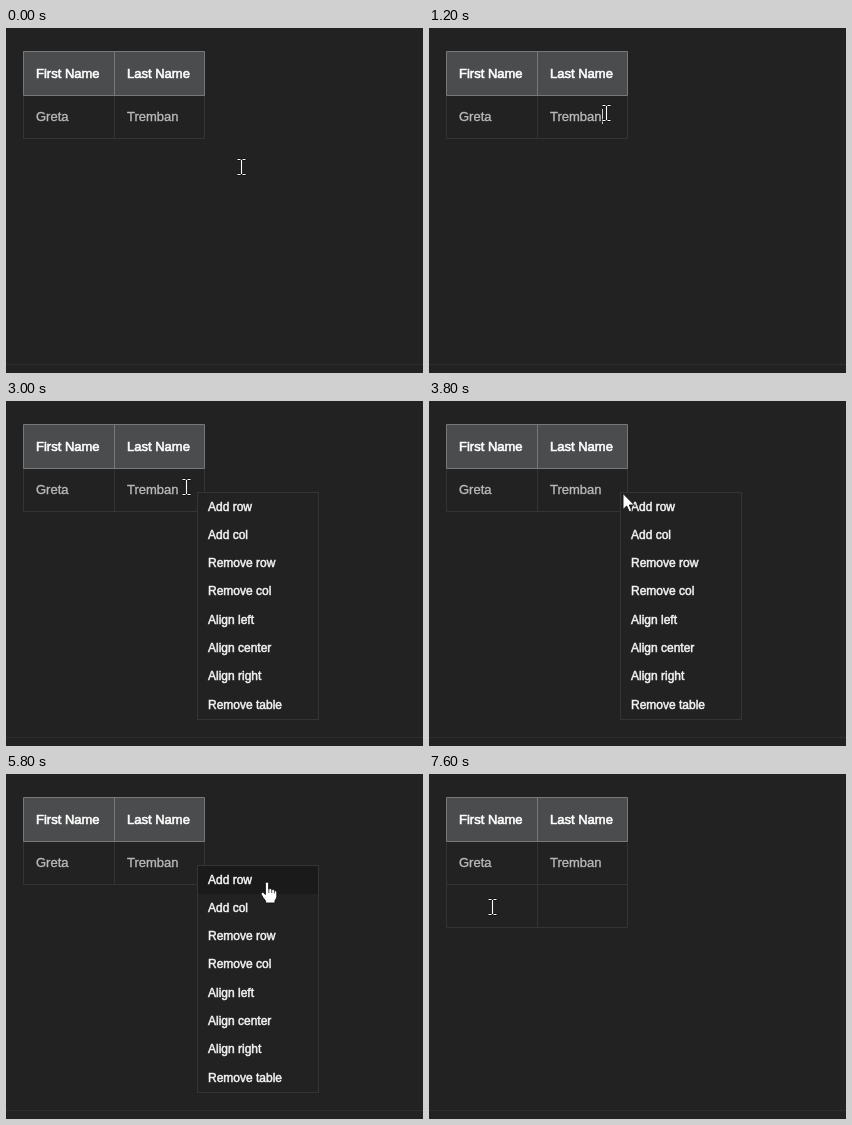
Write an HTML page that moves like this. It is 417 px wide and 345 px high and loops after 8000 ms.

```html
<!DOCTYPE html>
<html lang="en">
<head>
<meta charset="utf-8">
<title>Table editing</title>
<style>
html, body { margin: 0; width: 100%; height: 100%; overflow: hidden; background: #222; }
svg { display: block; width: 417px; height: 345px; }
text { font: 13px "Liberation Sans", Arial, sans-serif; white-space: pre; }
.head { fill: #fff; stroke: #fff; stroke-width: .6px; }
.cell { fill: #b9b9b9; stroke: #b9b9b9; stroke-width: .35px; }
.item { font-size: 12px; fill: #f4f4f4; stroke: #f4f4f4; stroke-width: .5px; }
.grid { fill: none; stroke: #343434; }
</style>
</head>
<body>
<svg viewBox="0 0 417 345">
  <defs>
    <path id="beamShape" d="M-4 -7.5H-1M1 -7.5H4M-4 7.5H-1M1 7.5H4M0 -7V7" fill="none"/>
  </defs>
  <rect width="417" height="345" fill="#222"/>
  <path d="M0 336.5H417" stroke="#302d2e"/>
  <path class="grid" d="M17.5 67V110.5H198.5V67M108.5 67V110"/>
  <path id="newRow" class="grid" d="M17.5 110V153.5H198.5V110M108.5 110V153"/>
  <path d="M17.5 23.5H198.5V67.5H17.5ZM108.5 23V67" fill="#4b4c4e" stroke="#77787a"/>
  <text class="head" x="30" y="50">First Name</text>
  <text class="head" x="121" y="50">Last Name</text>
  <text class="cell" x="30" y="93">Greta</text>
  <text class="cell" x="121" y="93">Tremban</text>
  <rect id="caret" width="1" height="15" fill="#d0d0d0"/>
  <g id="menu">
    <rect x="191.5" y="91.5" width="121" height="227" fill="#222" stroke="#343434"/>
    <rect id="hover" x="192" y="92" width="120" height="28" fill="#1a1a1a"/>
  </g>
  <g id="beam">
    <use href="#beamShape" stroke="#111" stroke-width="3"/>
    <use href="#beamShape" stroke="#fff" stroke-width="1.2"/>
  </g>
  <path id="arrow" d="M0 0V16L3.7 12.5L6.3 18.3L8.8 17.2L6.3 11.5H11.3Z" fill="#fff" stroke="#111" stroke-width=".9"/>
  <g id="hand">
    <path d="M-1.6 1.6Q-1.6 0 0 0T1.6 1.6V7Q3.8 5.8 4.6 7.7Q6.5 6.7 7.3 8.6Q9.8 8 9.8 10.6V14.5Q9.8 16.3 8 18.6V21H-1.4V19Q-4.5 15.2 -5.8 12.2Q-6.2 9.8 -4 10.2L-1.6 12.5Z" fill="#fff" stroke="#111" stroke-width=".9"/>
    <path d="M1.8 7V11M4.7 8V11M7.4 9V11.5" stroke="#333" stroke-width=".8"/>
  </g>
</svg>
<script>
const LOOP = 8000, STEP = 200;
const MENU_OPEN = 3000, ARROW = 3800, HOVER = 4000, ROW_ADDED = 6000;
const BLINK = 1050, BLINK_ON = 440;
const get = id => document.getElementById(id);
const menu = get('menu'), caret = get('caret');

['Add row', 'Add col', 'Remove row', 'Remove col', 'Align left',
 'Align center', 'Align right', 'Remove table'].forEach((label, i) => {
  const item = document.createElementNS('http://www.w3.org/2000/svg', 'text');
  item.setAttribute('class', 'item');
  item.setAttribute('x', 202);
  item.setAttribute('y', 110 + Math.floor(28.3 * i));
  item.textContent = label;
  menu.append(item);
});

// Each move eases the pointer to (x, y); lift arcs the path upwards.
const origin = { x: 236, y: 139 };
const moves = [
  { start: 0, end: 1200, x: 178, y: 85, lift: 30 },
  { start: 1400, end: 1800, x: 181, y: 86 },
  { start: 3400, end: ARROW, x: 194, y: 92.5 },
  { start: ARROW, end: 4600, x: 241, y: 108 },
  { start: 4600, end: 5400, x: 261, y: 108 },
  { start: ROW_ADDED, end: 7000, x: 64, y: 133 }
];

const within = (t, from, to) => t >= from && t < to;
const show = (node, on) => node.setAttribute('visibility', on ? 'visible' : 'hidden');
const smooth = p => p * p * (3 - 2 * p);

function pointerPosition(t) {
  let { x, y } = origin;
  for (const move of moves) {
    const p = Math.min(1, Math.max(0, (t - move.start) / (move.end - move.start)));
    x += (move.x - x) * smooth(p);
    y += (move.y - y) * smooth(p) - (move.lift || 0) * Math.sin(Math.PI * p);
  }
  return [x, y];
}

function pointerKind(t) {
  if (within(t, ARROW, HOVER)) return 'arrow';
  return within(t, HOVER, ROW_ADDED) ? 'hand' : 'beam';
}

function caretVisible(t, focusTime) {
  return t >= focusTime && (t - focusTime) % BLINK < BLINK_ON;
}

function render(time) {
  const t = Math.floor((time % LOOP) / STEP) * STEP;
  const rowAdded = t >= ROW_ADDED;

  menu.setAttribute('display', within(t, MENU_OPEN, ROW_ADDED) ? 'inline' : 'none');
  get('hover').setAttribute('display', t >= HOVER ? 'inline' : 'none');
  show(get('newRow'), rowAdded);
  show(caret, caretVisible(t, rowAdded ? ROW_ADDED - 50 : 1150));
  caret.setAttribute('x', rowAdded ? 30 : 173);
  caret.setAttribute('y', rowAdded ? 124 : 81);

  const kind = pointerKind(t);
  const [x, y] = pointerPosition(t);
  // Half a pixel keeps the thin beam stem crisp.
  const left = kind === 'beam' ? Math.round(x) - 0.5 : x;
  const top = kind === 'beam' ? Math.round(y) : y;
  for (const id of ['beam', 'arrow', 'hand']) {
    show(get(id), id === kind);
    get(id).setAttribute('transform', `translate(${left} ${top})`);
  }
}

const start = performance.now();
function tick() {
  render(performance.now() - start);
  requestAnimationFrame(tick);
}
tick();
</script>
</body>
</html>
```
